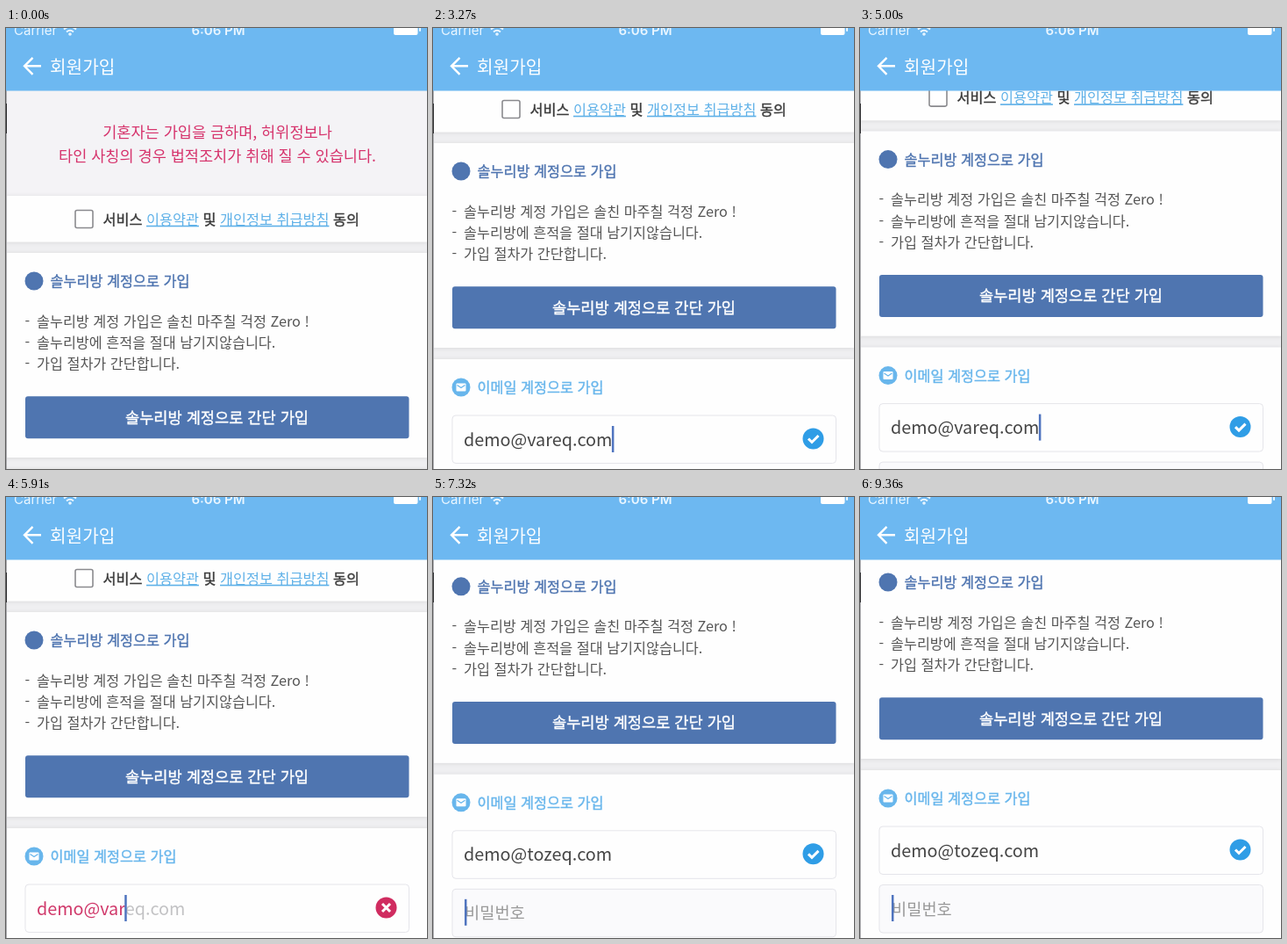
Write an HTML page that moves like this. It is 480x502 px and loops after 9400 ms.

```html
<!DOCTYPE html>
<html lang="ko">
<head>
<meta charset="utf-8">
<title>회원가입</title>
<style>
  html, body { margin: 0; width: 100%; height: 100%; overflow: hidden; background: #f4f3f6; }
  svg { display: block; width: 100vw; height: 100vh; font-family: "Noto Sans CJK KR", "Noto Sans CJK", "Noto Sans CJK JP", sans-serif; }
  .card { fill: #fefefe; filter: url(#shadow); }
  .warning { font-size: 17.55px; fill: #d6336c; text-anchor: middle; }
  .body { font-size: 16.25px; fill: #555; }
  .strong { font-size: 16.3px; fill: #3c3c3c; stroke: #3c3c3c; stroke-width: .4px; }
  .link { fill: #5fb1e8; stroke: none; text-decoration: underline; }
  .social { fill: #4f75b0; stroke: #4f75b0; }
  .mail { fill: #68b6ec; stroke: #68b6ec; }
  .plain { stroke: none; }
  .button { font-size: 17.6px; fill: #fff; stroke: #fff; stroke-width: .4px; text-anchor: middle; }
  .field { fill: #fafafc; stroke: #e5e5ea; }
  .hint { font-size: 18.7px; fill: #999; }
  .entry { font-size: 19.8px; }
  .mark { fill: none; stroke: #fff; stroke-width: 3; }
  .status { font-family: Inter, "Liberation Sans", sans-serif; font-size: 15px; fill: #eaf6ff; }
</style>
</head>
<body>
<svg viewBox="0 0 480 502">
  <defs>
    <filter id="shadow" x="-5%" y="-10%" width="110%" height="120%">
      <feDropShadow dx="0" dy=".5" stdDeviation="2" flood-opacity=".11"/>
    </filter>
  </defs>
  <rect width="480" height="502" fill="#f4f3f6"/>

  <g id="page">
    <rect y="243" width="480" height="300" fill="#efeff1"/>
    <text class="warning" x="241" y="125.3">기혼자는 가입을 금하며, 허위정보나</text>
    <text class="warning" x="241" y="151.5">타인 사칭의 경우 법적조치가 취해 질 수 있습니다.</text>

    <rect class="card" y="191" width="480" height="52.5"/>
    <rect x="79" y="207.5" width="20" height="20" rx="2" fill="#fff" stroke="#8a8a8e" stroke-width="1.6"/>
    <text class="strong" x="110.5" y="223.7">서비스 <tspan class="link">이용약관</tspan> 및 <tspan class="link">개인정보 취급방침</tspan> 동의</text>

    <rect class="card" y="256" width="480" height="233"/>
    <circle class="social plain" cx="32" cy="288" r="10.5"/>
    <text class="strong social" x="50.5" y="294.3">솔누리방 계정으로 가입</text>
    <g class="body">
      <text x="21.5" y="339.5">-</text><text x="35" y="339.5">솔누리방 계정 가입은 솔친 마주칠 걱정 Zero !</text>
      <text x="21.5" y="364">-</text><text x="35" y="364">솔누리방에 흔적을 절대 남기지않습니다.</text>
      <text x="21.5" y="388">-</text><text x="35" y="388">가입 절차가 간단합니다.</text>
    </g>
    <rect class="social plain" x="22" y="419.3" width="437.5" height="48" rx="3"/>
    <text class="button" x="240.5" y="449.5">솔누리방 계정으로 간단 가입</text>

    <rect class="card" y="502" width="480" height="300"/>
    <circle class="mail plain" cx="32" cy="534" r="10.5"/>
    <rect x="26.5" y="529.5" width="11" height="9" rx="1" fill="#fff"/>
    <path d="M27.5 531.5l4.5 3 4.5-3" fill="none" stroke="#68b6ec" stroke-width="1.3"/>
    <text class="strong mail" x="50.5" y="540.3">이메일 계정으로 가입</text>

    <rect class="field" id="emailBox" x="22" y="566" width="437.5" height="54.5" rx="4"/>
    <text class="hint" id="emailHint" x="36" y="600.5">이메일</text>
    <text class="entry" x="35" y="600.5"><tspan id="typed"></tspan><tspan id="rest" fill="#c2c2c4"></tspan></text>
    <g id="valid">
      <circle cx="433.5" cy="592.5" r="12" fill="#2f9de6"/>
      <path class="mark" d="M428 592.5l4 4 7.5-7.5"/>
    </g>
    <g id="invalid">
      <circle cx="433.5" cy="592.5" r="12" fill="#d02c60"/>
      <path class="mark" d="M429 588l9 9m0-9l-9 9"/>
    </g>

    <rect class="field" x="22" y="632.5" width="437.5" height="54.5" rx="4"/>
    <text class="hint" x="36" y="666.5">비밀번호</text>
    <rect id="caret" width="2.5" height="30" fill="#4f74bf"/>
  </g>

  <rect y="71" width="1" height="431" fill="#a9a9ac"/>
  <rect y="86" width="1" height="34" fill="#2a2a2c"/>

  <rect width="480" height="71.5" fill="#6db8f1"/>
  <text class="status" x="9" y="8.4">Carrier</text>
  <g fill="none" stroke="#eaf6ff" stroke-width="2">
    <path d="M66 1.5q7-6 14 0M69 4.5q4-3.5 8 0"/>
    <circle cx="73" cy="7" r=".8"/>
  </g>
  <text class="status" x="242" y="8.4" text-anchor="middle" font-weight="600">6:06 PM</text>
  <rect x="442" y="-5" width="27.5" height="13" rx="2" fill="#fff"/>
  <rect x="471" y="-1" width="2" height="5" rx="1" fill="#eaf6ff"/>
  <path d="M40 43.3H21m9.5-9.5L21 43.3l9.5 9.5" fill="none" stroke="#fff" stroke-width="2.4"/>
  <text x="50" y="51.5" font-size="20.2" fill="#fff">회원가입</text>
</svg>

<script>
const LOOP = 9400, SCROLL_TIME = 500;
const FIRST = 'demo@vareq.com', SECOND = 'demo@tozeq.com';
const DOMAIN_START = 5;
const get = id => document.getElementById(id);

const focuses = [
  { at: 300, field: 'email', scroll: 125 },
  { at: 3600, field: 'password', scroll: 191 },
  { at: 4795, field: 'email', scroll: 125 },
  { at: 7030, field: 'password', scroll: 191 },
];

// Each edit leaves the first `count` letters of `address` in the field.
const edits = [];
function edit(address, from, to, start, step) {
  const dir = Math.sign(to - from);
  for (let i = 0; i <= Math.abs(to - from); i++)
    edits.push({ at: start + i * step, address, count: from + i * dir });
}
edit(FIRST, 1, 8, 1550, 170);
edit(FIRST, 14, 14, 3050, 0);
edit(FIRST, 13, 5, 5350, 95);
edit(SECOND, 6, 7, 6350, 170);
edit(SECOND, 14, 14, 6700, 0);

const latest = (list, t) => list.filter(item => item.at <= t).pop();

function scrollAt(t) {
  let y = 0;
  for (const { at, scroll } of focuses) {
    const u = Math.min(1, Math.max(0, (t - at) / SCROLL_TIME));
    y += (scroll - y) * (1 - (1 - u) ** 3);
  }
  return y;
}

const show = (id, on) => get(id).setAttribute('visibility', on ? 'visible' : 'hidden');

function draw(t) {
  const focus = latest(focuses, t);
  const { at, address, count } = latest(edits, t) || { at: 0, address: '', count: 0 };
  const complete = count === FIRST.length;
  const typed = get('typed');

  get('page').setAttribute('transform', `translate(0 ${-scrollAt(t)})`);
  typed.textContent = address.slice(0, count);
  typed.setAttribute('fill', complete ? '#444' : '#d0386a');
  get('rest').textContent = count > DOMAIN_START ? address.slice(count) : '';
  get('emailBox').style.fill = focus ? '#fefefe' : '';
  show('emailHint', !count);
  show('valid', complete);
  show('invalid', count && !complete);

  const inEmail = focus && focus.field === 'email';
  const idle = focus ? t - Math.max(focus.at, at) : 0;
  const caret = get('caret');
  caret.setAttribute('x', inEmail && count ? 34.5 + typed.getComputedTextLength() : 36);
  caret.setAttribute('y', inEmail ? 578 : 644);
  show('caret', focus && idle % 1000 < 500);
}

const start = performance.now();
function frame() {
  draw((performance.now() - start) % LOOP);
  requestAnimationFrame(frame);
}
frame();
</script>
</body>
</html>
```
